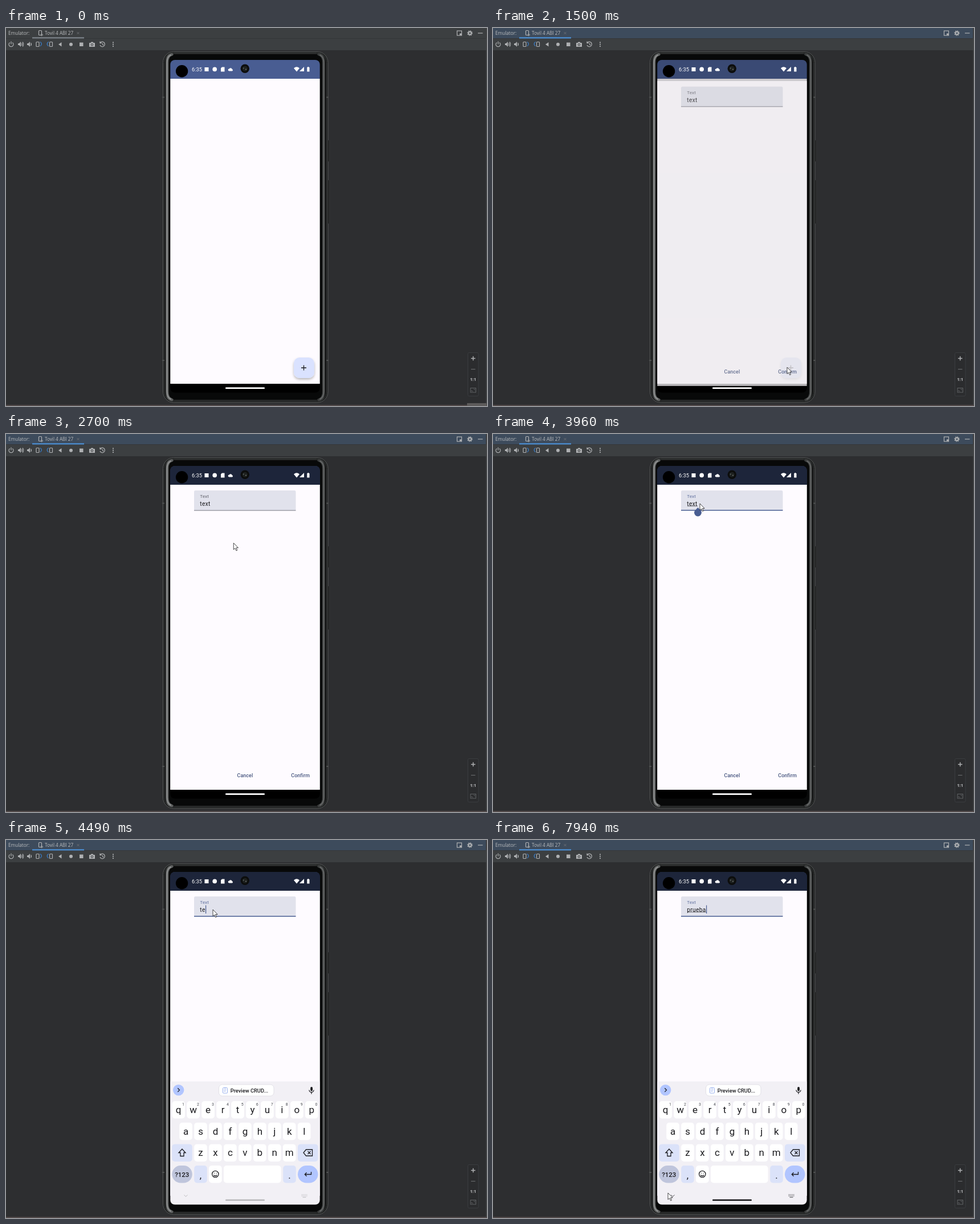
An HTML page for the animation above (8 s loop, 844 by 663 pixels).

```html
<!DOCTYPE html>
<html lang="en">
<head>
<meta charset="utf-8">
<title>Emulator demo</title>
<style>
  html, body { margin: 0; width: 100%; height: 100%; overflow: hidden; background: #2d2e30; }
  svg { display: block; width: 844px; height: 663px; }
  text { font-family: Roboto, sans-serif; white-space: pre; }
  .ide { font: 8.2px "Open Sans", sans-serif; fill: #bbbdbf; }
  .line { fill: none; stroke: #afb1b3; stroke-width: 1.2; }
  .btn { font-size: 8.95px; font-weight: 500; letter-spacing: .06px; fill: #46557f; }
  .key { font-size: 17px; text-anchor: middle; fill: #1b1b1f; }
  .hint { font-size: 7px; text-anchor: middle; fill: #45464f; }
  .ink { fill: none; stroke: #1b1b1f; stroke-width: 1.3; }
</style>
</head>
<body>
<svg viewBox="0 0 844 663">
  <defs>
    <clipPath id="screen"><rect x="288.300" y="56" width="262.400" height="583.500" rx="8"/></clipPath>
    <clipPath id="fabClip"><rect x="505" y="578" width="36" height="36" rx="10"/></clipPath>
    <filter id="shadow" x="-30%" y="-30%" width="160%" height="170%">
      <feDropShadow dx="0" dy="2.5" stdDeviation="2.2" flood-opacity=".28"/>
    </filter>
  </defs>

  <!-- tool window -->
  <rect width="844" height="663" fill="#2d2e30"/>
  <rect id="header" width="842" height="18" fill="#3c3f41"/>
  <rect y="18" width="844" height="21" fill="#3c3f41"/>
  <rect y="18" width="844" height="1" fill="#343638"/>
  <rect x="842.5" width="1.5" height="663" fill="#47494b"/>
  <rect id="tabLine" x="46" y="16" width="91" height="2.5" fill="#757b81"/>
  <text class="ide" x="4" y="12">Emulator:</text>
  <text class="ide" x="68" y="12">Tovil 4 ABI 27</text>
  <g class="line">
    <rect x="57.5" y="4.5" width="5" height="8" rx="1"/>
    <path d="M62 10l3 2-3 2z" stroke-width=".8"/>
    <path d="M124.500 7l4 4m0-4l-4 4" stroke="#74787b" stroke-width=".8"/>
    <rect x="791.500" y="5" width="8" height="8"/><path d="M796 11h3" stroke-width="3"/>
    <circle cx="814" cy="9" r="2.500" stroke-width="2"/>
    <circle cx="814" cy="9" r="4" stroke-width="1.500" stroke-dasharray="1.6 1.540"/>
    <path d="M828 9h8.500"/>
    <path d="M6.700 25.500a4 4 0 1 0 4.600 0M9 23.500v5"/>
    <path d="M27.500 26q2 2.500 0 5M29 24.500q3.500 4 0 8M43.500 26q2 2.500 0 5"/>
    <rect x="53" y="24.500" width="5" height="8" rx="1"/>
    <path d="M59.500 24.500q3.500 1 2.500 5l-2 2.500" stroke="#3b82d0"/>
    <rect x="76.500" y="24.500" width="5" height="8" rx="1"/>
    <path d="M75 24.500q-3.500 1-2.500 5l2 2.500" stroke="#3b82d0"/>
    <path d="M165.500 26a4.300 4.300 0 1 1-.5 4M165 23.500v3h3M169.500 26.500v2.500l2 1"/>
  </g>
  <g fill="#afb1b3">
    <path d="M21 27h2l3-3v9l-3-3h-2zM37 27h2l3-3v9l-3-3h-2zM97.500 25v7.500l-5.500-3.700z"/>
    <circle cx="114" cy="28.700" r="3"/><rect x="129" y="25.500" width="6.500" height="6.500"/>
    <path d="M146 26h2.500l1-1.500h3l1 1.500h2.500v7h-10z"/><circle cx="151" cy="29.300" r="2.200" fill="#3c3f41"/>
    <circle cx="151" cy="29.300" r="1.200"/>
    <circle cx="188" cy="25.300" r="1.100"/><circle cx="188" cy="28.700" r="1.100"/><circle cx="188" cy="32.100" r="1.100"/>
  </g>
  <rect y="661" width="844" height="2" fill="#514949"/>
  <rect id="block" x="809" y="658" width="34" height="5" fill="#5d5b5b"/>

  <!-- zoom panel -->
  <rect x="810.500" y="569.500" width="18.500" height="76" rx="2" fill="#2b2c2e" stroke="#3b3d40"/>
  <g class="line">
    <path d="M816 579.500h7.500M819.700 575.800v7.500" stroke-width="1.500"/>
    <path d="M816 598.500h7.500" stroke="#66696b"/>
    <rect x="815" y="631.500" width="9.500" height="7.500" stroke="#606365" stroke-width="1"/>
    <path d="M817 635v2h2M822.500 635.500v-2h-2" stroke="#606365" stroke-width=".8"/>
  </g>
  <text class="ide" x="819.700" y="619" text-anchor="middle" style="font-weight:700;font-size:7.500px">1:1</text>

  <!-- phone body -->
  <path d="M566 197v37M566 267v76" stroke="#111" stroke-width="3"/>
  <path d="M567.500 197v37M567.500 267v76" stroke="#47494a" stroke-width=".7"/>
  <rect x="275.500" y="41.500" width="289.500" height="615.500" rx="19" fill="#1b1d1d" stroke="#565858"/>
  <rect x="278" y="43.500" width="284.500" height="611.500" rx="17" fill="#101111" stroke="#3a3c3c"/>
  <rect x="281.500" y="45" width="277" height="608" rx="14" fill="#0a0b0b" stroke="#414343"/>
  <g fill="none" stroke-linecap="round">
    <path d="M291 46.500Q282.800 48 282.800 60V638Q282.800 650 291 652" stroke="#5c5e5e" stroke-width="5"/>
    <path d="M289 47.500Q282.500 50 282.500 61V637Q282.500 648 289 651" stroke="#8f9191" stroke-width="2"/>
    <path d="M549 46.500Q557.300 48 557.300 60V638Q557.300 650 549 652" stroke="#3c3e3e" stroke-width="5"/>
    <path d="M551 47.500Q557.500 50 557.500 61V637Q557.500 648 551 651" stroke="#646666" stroke-width="2"/>
  </g>
  <rect x="286" y="47.500" width="268.500" height="603.500" rx="11" fill="#080909"/>
  <path d="M274 121.500h4M562 121.500h4M274 583h4M562 583h4" stroke="#4e5050" stroke-width="2"/>

  <g clip-path="url(#screen)">
    <rect x="288" y="56" width="263" height="584" fill="#000"/>
    <rect x="288" y="56" width="263" height="33" fill="#495d92"/>
    <rect x="288" y="89" width="263" height="535" fill="#fefbff"/>
    <rect x="505" y="578" width="36" height="36" rx="10" fill="#dae2ff" filter="url(#shadow)"/>
    <circle id="ripple" cx="516" cy="595" fill="#001947" clip-path="url(#fabClip)"/>
    <path d="M518 596h9M522.500 591.500v9" class="ink"/>
    <rect id="dim" x="288" y="56" width="263" height="568"/>

    <g id="dialog">
      <rect x="288" y="89" width="263" height="535" fill="#fefbff"/>
      <path d="M330 134.300V101.500q0-2.500 2.500-2.500h173.500q2.500 0 2.500 2.500V134.300z" fill="#e1e2ec"/>
      <rect id="fieldLine" x="330" width="178.500"/>
      <text id="label" x="340.500" y="112.300" font-size="7.670" letter-spacing=".26">Text</text>
      <text id="value" x="340.300" y="125.700" font-size="10.200" letter-spacing=".32" fill="#1b1b1f"></text>
      <rect id="under" x="341" y="126" height="1" fill="#1b1b1f" opacity=".5"/>
      <rect id="caret" y="114.500" width="1.200" height="14.500" fill="#495d92"/>
      <path id="handle" d="M359.500 129l4.500 4.500a6.400 6.400 0 1 1-9 0z" fill="#495d92"/>
      <text class="btn" x="405.500" y="602">Cancel</text>
      <text class="btn" x="500.300" y="602">Confirm</text>
    </g>

    <g id="keyboard">
      <rect x="288" y="423.500" width="263" height="217" fill="#f2f0f5"/>
      <g id="keys"></g>
      <circle cx="302.700" cy="438.600" r="9.700" fill="#b1c5ff"/>
      <path class="ink" d="M301.300 435.300l3.200 3.300-3.200 3.300"/>
      <rect x="373.500" y="429" width="96.500" height="20" rx="6" fill="#fff" stroke="#dcdbe2" stroke-width=".8"/>
      <g fill="none" stroke="#9bb2ee"><rect x="380.500" y="434.500" width="8" height="9.500" rx="1"/>
        <path d="M382.500 435h4M382.500 438h4M382.500 440.500h3"/></g>
      <text x="393.700" y="442.900" font-size="9.300" font-weight="500" fill="#1b1b1f">Preview CRUD...</text>
      <rect x="534.200" y="433" width="3.800" height="7.500" rx="1.900" fill="#1b1b1f"/>
      <path class="ink" d="M532 438.500a4 4 0 0 0 8 0M536 442.500v3"/>
      <path class="ink" d="M309 542l-6 6.500h3v6h6v-6h3z"/>
      <path class="ink" d="M522 548.500l4.500-5.500h11v11h-11zM529.500 546l5 5m0-5l-5 5"/>
      <circle class="ink" cx="367.300" cy="586" r="5.700"/>
      <path class="ink" d="M364.300 587.500q3 3.500 6 0M365 584.300h1M368.600 584.300h1"/>
      <path class="ink" d="M535.500 582v4.500h-11M527.500 583.300l-3.200 3.200 3.200 3.200"/>
      <g id="navIcons" fill="none" stroke-width="1">
        <path d="M312.500 622.500l3 3 3-3"/>
        <path d="M518.500 622h10M518.500 624.300h10" stroke-dasharray="1.300 .9"/><path d="M520.500 626.700h6"/>
      </g>
    </g>
    <rect id="home" x="385" y="630.300" width="69" height="2.700" rx="1.350"/>

    <!-- status bar -->
    <circle cx="308.600" cy="75.800" r="10.700"/>
    <g fill="#fff">
      <text x="326" y="75.800" font-size="9.400">6:35</text>
      <rect x="348.500" y="69" width="7" height="7"/><circle cx="366.200" cy="72.400" r="3.800"/>
      <path d="M379 68.500h4.500v8h-6.500v-6zM391.500 75.500a2 2 0 0 1 .3-4 2.800 2.800 0 0 1 5 .8 1.700 1.700 0 0 1 0 3.200z"/>
      <path d="M505 70.500q5-4.500 10 0l-5 6zM523 68v8h-8zM528.300 69h1v-1h2v1h1.200v7.500h-4.200z"/>
    </g>
    <circle cx="419.300" cy="71.200" r="7.700" fill="#0c0d0c"/>
    <circle cx="419.300" cy="71.200" r="4.500" fill="#1d201f"/>
    <circle cx="416.800" cy="70.500" r="1" fill="#5d6560"/><circle cx="421" cy="72.500" r=".9" fill="#7b8078"/>
  </g>

  <path id="pointer" d="M0 0V11.600L2.700 9.200 4.700 13.600 6.500 12.800 4.600 8.500H8.200Z" fill="#fff" stroke="#1c1c1e" stroke-width=".8"/>
</svg>
<script>
const LOOP = 8000;
const STEP = 200 / 3; // the pointer moves 15 times per second
const $ = id => document.getElementById(id);
const set = (id, attrs) => { for (const k in attrs) $(id).setAttribute(k, attrs[k]); };
const show = (id, on) => $(id).setAttribute("visibility", on ? "visible" : "hidden");
const part = (t, a, b) => Math.min(1, Math.max(0, (t - a) / (b - a)));

// pointer track: time, x, y
const track = [
  [310, 738, 645], [500, 645, 612], [720, 552, 589], [900, 522, 590], [1040, 516, 595],
  [1840, 516, 595], [2100, 495, 505], [2400, 440, 310], [2640, 403, 202], [2700, 400.7, 195],
  [3000, 388, 160], [3330, 363, 122], [7200, 363, 122], [7280, 372, 155], [7420, 396, 300],
  [7600, 360, 520], [7740, 310, 644], [7830, 294, 638], [7930, 307, 619]
];
// field states: time, text, caret x (0 = off), underline width
const edits = [
  [0, "text", 0, 0], [3490, "text", 359, 0], [3630, "text", 359, 18], [3960, "text", 0, 18],
  [4360, "tex", 355.5, 0], [4490, "te", 350, 0], [4690, "t", 344, 0], [4880, "", 340, 0],
  [5420, "", 0, 0], [5820, "", 340, 0], [6080, "pr", 350, 0], [6280, "pru", 356, 0],
  [6420, "prue", 362, 0], [6620, "prueb", 368, 0], [6750, "prueba", 374, 0],
  [7010, "prueba", 374, 33], [7270, "prueba", 0, 33], [7760, "prueba", 374, 33]
];
// grey levels: time, home bar, icons
const greys = [[4220, 225, 225], [4490, 188, 186], [4690, 160, 170], [5150, 115, 130], [5420, 85, 105], [5820, 36, 70]];

const mix = (rows, t) => {
  const i = rows.findIndex(r => r[0] > t);
  if (i === 0) return rows[0].slice(1);
  if (i < 0) return rows[rows.length - 1].slice(1);
  const a = rows[i - 1], b = rows[i], p = part(t, a[0], b[0]);
  return a.slice(1).map((v, k) => v + (b[k + 1] - v) * p);
};
const grey = v => `rgb(${v},${v},${v + 3})`;

function buildKeys() {
  let out = "";
  const key = (x, y, w, fill = "#fff", rx = 5) =>
    out += `<rect x="${x}" y="${y}" width="${w}" height="30.500" rx="${rx}" fill="${fill}"/>`;
  const label = (s, x, y, cls = "key", extra = "") =>
    out += `<text class="${cls}" x="${x}" y="${y}" ${extra}>${s}</text>`;
  [["qwertyuiop", 302.7, 458], ["asdfghjkl", 315.6, 495.7], ["zxcvbnm", 341.5, 533.4]].forEach(([row, x0, y], r) =>
    [...row].forEach((c, i) => {
      const x = x0 + i * 25.95;
      key(x - 11.3, y, 22.6);
      label(c, x, y + 20.8);
      if (!r) label((i + 1) % 10, x + 8.3, y + 8, "hint");
    }));
  key(291.3, 533.4, 35.5, "#dbe2f9");
  key(512, 533.4, 35.5, "#dbe2f9");
  key(291.3, 571, 35.5, "#bfc5dc", 15.2);
  key(330.2, 571, 22.6, "#dbe2f9");
  key(356.1, 571, 22.6);
  key(382, 571, 100.5);
  key(486.2, 571, 22.6, "#dbe2f9");
  key(512, 571, 35.5, "#b1c5ff", 15.2);
  label("?123", 308.8, 590.5, "key", 'style="font-size:11.500px;font-weight:500"');
  label(",", 341.5, 594);
  label(".", 497.5, 594);
  $("keys").innerHTML = out;
}

function draw(t) {
  const active = t >= 1170, focus = t >= 3490;
  set("header", { fill: active ? "#3d4b5c" : "#3c3f41" });
  set("tabLine", { fill: active ? "#4a88c7" : "#757b81" });
  show("block", t < 70);

  set("ripple", { r: active ? 6 + 26 * part(t, 1170, 1380) : 0, opacity: .1 * (1 - part(t, 1400, 1700)) });
  const open = part(t, 1400, 1700);
  set("dim", { opacity: .6 * open });
  set("dialog", {
    opacity: 1 - (1 - part(t, 1400, 1610)) ** 2,
    transform: `translate(0 ${30 * (1 - open) ** 5})`
  });

  const [, text, caret, under] = edits.findLast(e => e[0] <= t);
  if ($("value").textContent !== text) $("value").textContent = text;
  set("caret", { x: caret });
  show("caret", caret);
  set("under", { width: under });
  set("label", { fill: focus ? "#5b6b9b" : "#5b5c66" });
  set("fieldLine", focus ? { y: 133, height: 1.5, fill: "#495d92" } : { y: 133.6, height: .9, fill: "#6c6d77" });
  show("handle", t >= 3560 && t < 4360);

  const up = part(t, 3975, 4220);
  set("keyboard", { transform: `translate(0 ${217 * (1 - up) ** 2})` });
  show("keyboard", up);
  const [bar, icons] = mix(greys, t);
  set("home", { fill: up ? grey(bar) : "#fff" });
  set("navIcons", { stroke: grey(icons) });

  const [x, y] = mix(track, Math.round(t / STEP) * STEP);
  set("pointer", { transform: `translate(${x} ${y})` });
  show("pointer", t >= 310);
}

buildKeys();
const start = performance.now();
function tick() {
  draw((performance.now() - start) % LOOP);
  requestAnimationFrame(tick);
}
tick();
</script>
</body>
</html>
```
